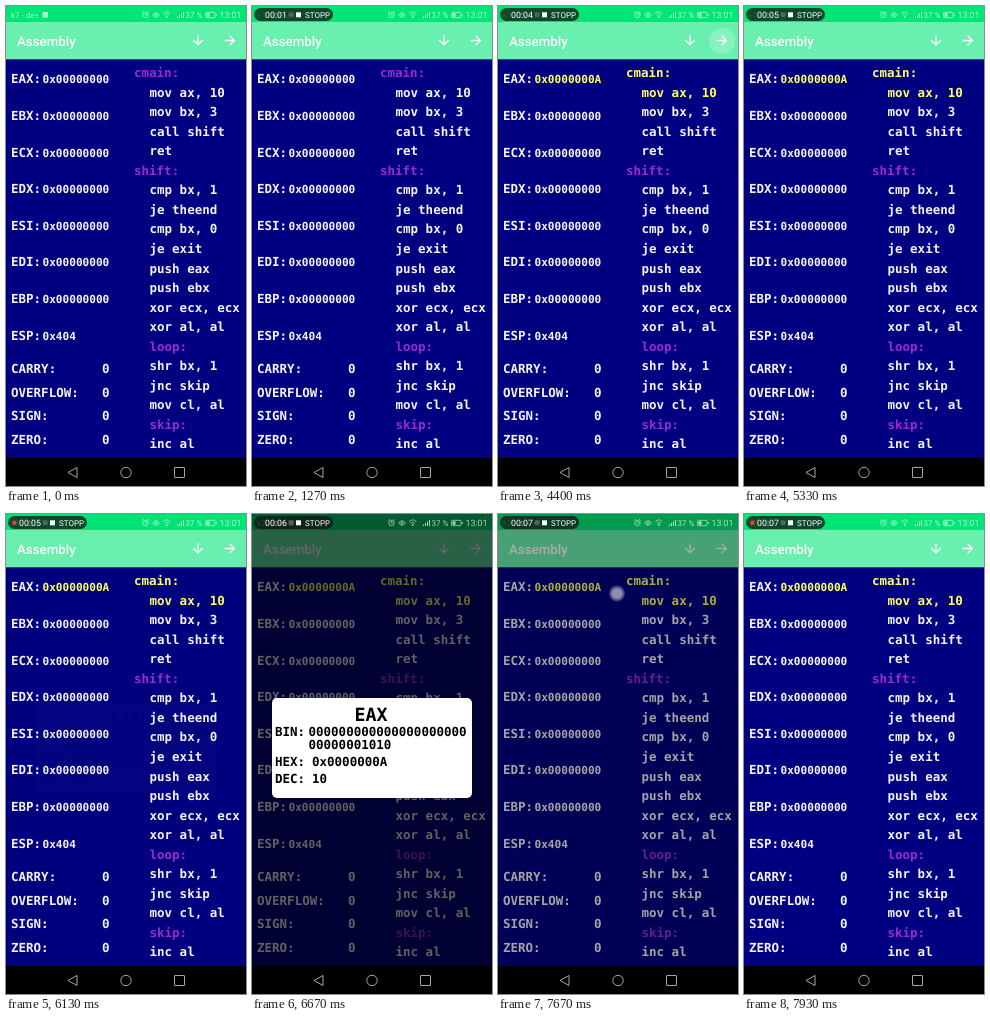
An HTML page for the animation above (8 s loop, 240 by 480 pixels).

```html
<!DOCTYPE html>
<html lang="en">
<head>
<meta charset="utf-8">
<title>Assembly stepper</title>
<style>
html, body { margin: 0; width: 100%; height: 100%; overflow: hidden; background: #000080; }
svg.stage { display: block; width: 100vw; height: 100vh; }
text { white-space: pre; text-rendering: geometricPrecision; }
.mono { font: bold 12.5px "DejaVu Sans Mono", monospace; fill: #f4f4f4; }
.value { font-size: 11.1px; }
.label { fill: #9a2bd0; }
.ui { font: 8px Roboto, sans-serif; fill: #fff; }
.title { font: 500 13.3px Roboto, sans-serif; fill: #fff; }
.dialog .mono { fill: #000; }
.dialog .heading { font-size: 18.3px; }
.outline { fill: none; stroke: #d0d0d0; stroke-width: .8; }

.called, .moved, .before, .after, .finger { animation: 8s step-end infinite; }
.called { animation-name: called; }
.moved { animation-name: moved; }
.before { animation-name: before; }
.after { fill: #ff6; animation-name: after; }
.finger { animation-name: finger; }
.ripple { animation: ripple 8s linear infinite; transform-origin: 224px 35px; }
.dim { animation: dim 8s linear infinite; }
.dialog { animation: dialog 8s linear infinite; transform-origin: 120px 234px; }
.pill { animation: pill 8s linear infinite; }
.ticker { animation: tick 8s steps(8) .2s infinite; }
.ticker text, .clock { font-size: 8.8px; }
.rec { animation: blink 1s step-end .2s infinite; }

@keyframes called { 0% { fill: #9a2bd0; } 37.5%, 100% { fill: #ff6; } }
@keyframes moved { 0% { fill: #f4f4f4; } 55%, 100% { fill: #ff6; } }
@keyframes before { 0% { opacity: 1; } 55%, 100% { opacity: 0; } }
@keyframes after { 0% { opacity: 0; } 55%, 100% { opacity: 1; } }
@keyframes finger {
  0%, 36.9%, 54.4%, 75.75%, 96.25%, 100% { opacity: 0; }
  35%, 52.5% { opacity: 1; transform: translate(224px, 35px); }
  74.1% { opacity: 1; transform: translate(72px, 74px); }
  93.75% { opacity: 1; transform: translate(119px, 79.5px); }
}
@keyframes ripple {
  0%, 35%, 52.5% { opacity: 0; transform: scale(.4); }
  37.5%, 55% { opacity: .2; transform: none; }
  40%, 57.5% { opacity: 0; transform: none; }
  40.01%, 57.51%, 100% { opacity: 0; transform: scale(.4); }
}
@keyframes dim {
  0%, 76.6% { opacity: 0; }
  79.1%, 94.9% { opacity: .6; }
  97.1%, 100% { opacity: 0; }
}
@keyframes dialog {
  0%, 76.6% { opacity: 0; transform: scale(.9); }
  78.75%, 94% { opacity: 1; transform: none; }
  95.5%, 100% { opacity: 0; transform: scale(.95); }
}
@keyframes pill { 0%, 3.1% { opacity: 0; } 5.6%, 100% { opacity: 1; } }
@keyframes tick { to { transform: translateY(-96px); } }
@keyframes blink { 0% { opacity: 0; } 50%, 100% { opacity: 1; } }
</style>
</head>
<body>
<svg class="stage" viewBox="0 0 240 480" preserveAspectRatio="none">
  <defs>
    <path id="arrow" d="M12 4l-1.41 1.41L16.17 11H4v2h12.17l-5.58 5.59L12 20l8-8z" transform="scale(.667) translate(-12 -12)" fill="#fff"/>
  </defs>
  <rect width="240" height="480" fill="#000080"/>
  <rect width="240" height="53.33" fill="#69f0ae"/>
  <rect width="240" height="16" fill="#00e676"/>
  <text class="title" x="11" y="39.5">Assembly</text>
  <circle class="ripple" cx="224" cy="35" r="13" fill="#fff"/>
  <use href="#arrow" transform="translate(192 34.5) rotate(90)"/>
  <use href="#arrow" transform="translate(224 34.5)"/>

  <g id="registers"></g>
  <g id="flags"></g>
  <g id="code"></g>

  <rect class="dim" width="240" height="452"/>

  <g class="dialog">
    <rect x="20" y="184" width="200" height="100" rx="5" fill="#fff"/>
    <text class="mono heading" x="119" y="206.5" text-anchor="middle">EAX</text>
    <text class="mono" x="23" y="221.5">BIN:</text>
    <text class="mono" x="56.5" y="221.5">000000000000000000000</text>
    <text class="mono" x="56.5" y="234.5">00000001010</text>
    <text class="mono" x="23" y="251.5">HEX:</text>
    <text class="mono" x="60" y="251.5">0x0000000A</text>
    <text class="mono" x="23" y="268.5">DEC:</text>
    <text class="mono" x="60" y="268.5">10</text>
  </g>

  <!-- status bar -->
  <g class="ui" opacity=".7">
    <text x="5" y="11.7">k7 - de+</text>
    <rect x="36.5" y="6" width="5.5" height="5.5"/>
    <g fill="none" stroke="#fff" stroke-width=".8">
      <circle cx="139.5" cy="9" r="2.7"/>
      <path d="M139.5 7.2V9h1.4M136.3 6.6l1.5-1.5M142.7 6.6l-1.5-1.5"/>
      <path d="M146.5 9q3.5-4.5 7 0q-3.5 4.5-7 0z"/>
      <circle cx="150" cy="9" r="1"/>
      <path d="M157.2 7.6q3.6-3.4 7.2 0M158.6 9.3q2.2-2 4.4 0"/>
      <rect x="199.5" y="6.3" width="9.5" height="5.4" rx="1"/>
      <path d="M210.3 7.8v2.4"/>
    </g>
    <circle cx="160.8" cy="11" r=".9"/>
    <path d="M171 12v-1.6h1V12zM173 12V9h1v3zM175 12V7.5h1V12zM177 12V6h1v6z"/>
    <rect x="200.5" y="7.3" width="3" height="3.4"/>
    <text x="179.5" y="11.8">37 %</text>
    <text class="clock" x="213.5" y="12">13:01</text>
  </g>

  <!-- recorder -->
  <g class="pill">
    <rect x="2" y="2" width="79" height="13" rx="6.5" fill="#101814" fill-opacity=".76"/>
    <circle class="rec" cx="8.5" cy="8.7" r="2.2" fill="#f23b3b"/>
    <text class="ui clock" x="30" y="11.9" text-anchor="end">00:0</text>
    <svg x="30" y="3" width="6" height="11" overflow="hidden">
      <g class="ticker" id="ticker"></g>
    </svg>
    <circle cx="39" cy="8.7" r="1.8" fill="#4c5c54" stroke="#74857c" stroke-width=".6"/>
    <rect x="44" y="6.3" width="5" height="5" fill="#fff"/>
    <text class="ui" x="53" y="11.7">STOPP</text>
  </g>

  <!-- navigation bar -->
  <rect y="452" width="240" height="28"/>
  <g class="outline">
    <path d="M62 466.5l9-5v10z" stroke-linejoin="round"/>
    <circle cx="120" cy="466.5" r="5.2"/>
    <rect x="168.5" y="461.5" width="10" height="10" rx=".5"/>
  </g>

  <g class="finger" fill="#dcdce6">
    <circle r="7.8" fill-opacity=".35"/>
    <circle r="5.6" fill-opacity=".45"/>
  </g>
</svg>
<script>
function addText(parent, x, y, content, className) {
  const node = document.createElementNS('http://www.w3.org/2000/svg', 'text');
  node.setAttribute('x', x);
  node.setAttribute('y', y);
  node.setAttribute('class', className);
  node.textContent = content;
  document.getElementById(parent).append(node);
}

['EAX', 'EBX', 'ECX', 'EDX', 'ESI', 'EDI', 'EBP', 'ESP'].forEach((name, i) => {
  const y = 77.3 + i * 36.6;
  const value = name === 'ESP' ? '0x404' : '0x00000000';
  addText('registers', 5, y, name + ':', 'mono');
  addText('registers', 36.5, y, value, 'mono value' + (i ? '' : ' before'));
  if (!i) addText('registers', 36.5, y, '0x0000000A', 'mono value after');
});

['CARRY', 'OVERFLOW', 'SIGN', 'ZERO'].forEach((name, i) => {
  const y = 367.3 + i * 23.4;
  addText('flags', 5, y, name + ':', 'mono');
  addText('flags', 96, y, '0', 'mono');
});

const program = `cmain:
  mov ax, 10
  mov bx, 3
  call shift
  ret
shift:
  cmp bx, 1
  je theend
  cmp bx, 0
  je exit
  push eax
  push ebx
  xor ecx, ecx
  xor al, al
  loop:
  shr bx, 1
  jnc skip
  mov cl, al
  skip:
  inc al`;
const steps = ['called', 'moved'];
program.split('\n').forEach((line, i) => {
  const kind = line.endsWith(':') ? 'label' : '';
  const x = line.startsWith(' ') ? 143.5 : 128;
  addText('code', x, 71 + i * 19.55, line.trim(), `mono ${kind} ${steps[i] || ''}`);
});

for (let second = 0; second < 8; second++) {
  addText('ticker', 0, 8.9 + second * 12, second, 'ui');
}
</script>
</body>
</html>
```
